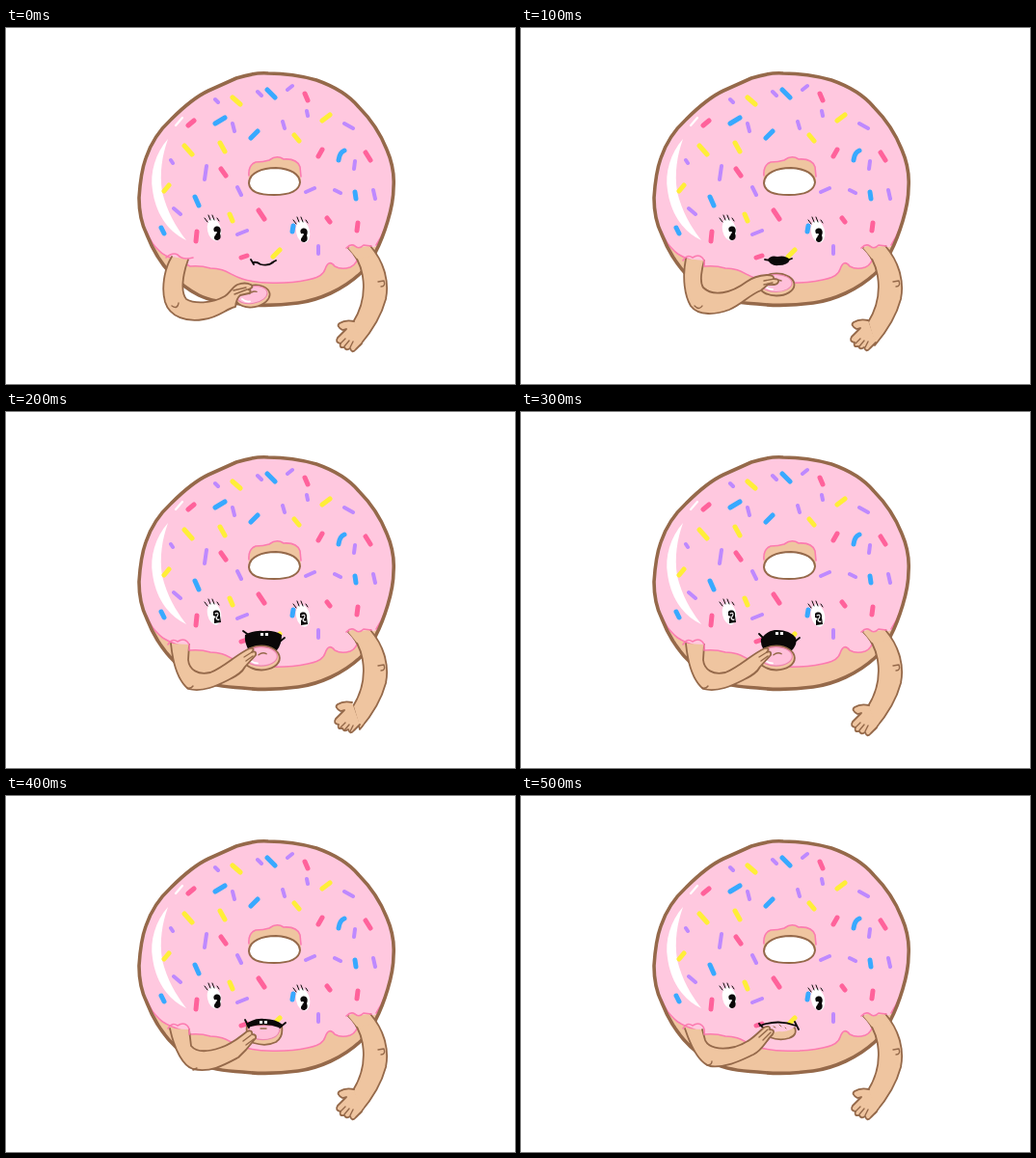
An HTML page that plays this animation: 528x369 px, repeating every 0.6 s.

```html
<!DOCTYPE html>
<html lang="en">
<head>
<meta charset="utf-8">
<title>Hungry donut</title>
<style>
  html, body { margin: 0; width: 100%; height: 100%; overflow: hidden; background: #fff; }
  svg { display: block; width: 100%; height: 100%; fill: none; stroke-linecap: round; stroke-linejoin: round; }
  .dough { fill: #efc5a0; }
  .skin { fill: #efc5a0; stroke: #95694a; stroke-width: 1.8; }
  .mark { stroke: #95694a; stroke-width: 1.4; }
  .crust { stroke: #95694a; stroke-width: 3.6; }
  .rim { stroke: #fc7bb0; stroke-width: 1.6; }
  .icing { fill: #ffc8df; }
  .glaze { fill: #ffc0da; stroke: #ee86b0; stroke-width: 1.1; }
  .white { fill: #fff; }
  .ink { fill: #0a0808; }
  .line { stroke: #0a0808; stroke-width: 1.8; }
  .lash { stroke: #0a0808; stroke-width: 1; }
  .sprinkles { stroke-width: 5; }
</style>
</head>
<body>
<svg viewBox="0 0 528 369">
  <defs>
    <path id="ring" d="M146 214C140 202 138 188 138 176C139 160 141 146 145 135C150 120 159 106 171 95C182 84 195 72 210 65L239 52C252 48 262 46 272 47C290 47 308 50 322 54C342 61 356 70 366 82C380 96 389 111 395 126C401 140 403 152 402 165C402 178 399 190 396 200C390 220 382 240 368 254C350 271 325 282 303 285C280 288 262 288 245 286C225 285 210 282 200 277C175 264 157 242 146 214Z"/>
    <clipPath id="inside"><use href="#ring"/></clipPath>
    <g id="eye">
      <ellipse class="white" rx="7" ry="11.7" transform="rotate(-12)"/>
      <path class="lash" d="M-10-12l3 4M-6-15l2 5M-2-15l2 5M3-12l2 3"/>
    </g>
    <g id="pupil">
      <path class="ink" d="M-1-5C4-7 6-2 4 2C6 7 3 9 1 9C-2 9-3 6-1 4C1 2-1 1-2 0C-3-2-3-4-1-5Z"/>
      <ellipse class="white" cx="-.5" cy="1" rx="1.5" ry="1.1"/>
    </g>
    <g id="smallPupil">
      <path class="ink" d="M-3-4C0-7 5-5 4 0L5 7L-2 8L-2 3L0 1L-3 0Z"/>
      <path d="M-1-2Q2-4 2-1L0 3Q2 5 3 4" stroke="#fff" stroke-width="1.1"/>
    </g>
    <g id="snack">
      <ellipse class="skin" rx="18.5" ry="11.5"/>
      <ellipse class="glaze" cx="-.5" cy="-1.5" rx="16.5" ry="9"/>
      <path d="M-12 1q3 4 8 4" stroke="#fff" stroke-width="1.8"/>
      <path class="mark" d="M-3-3q4-3 8-1"/>
    </g>
    <path id="cuff" class="rim" d="M168 241Q172 234 178 238Q184 234 188 238Q191 241 190 247"/>
  </defs>

  <use href="#ring" class="dough"/>
  <path class="icing" clip-path="url(#inside)" d="M120 30H420V190L385 226L366 232Q365 245 357 248Q348 251 341 247Q335 239 331 250Q329 258 313 261C290 266 261 265 245 260C232 256 228 249 212 249Q202 246 191 247C177 240 165 238 159 231Q150 223 146 211H120Z"/>
  <path class="rim" d="M146 211Q150 223 159 231C165 238 177 240 191 247Q202 246 212 249C228 249 232 256 245 260C261 265 290 266 313 261Q329 258 331 250Q335 239 341 247Q348 251 357 248Q365 245 366 232M400 186Q395 208 384 225"/>
  <use href="#ring" class="crust"/>

  <path class="dough" d="M252 160Q250 142 259 139Q267 139 273 137Q281 131 288 136Q302 135 305 144L306 160Z"/>
  <path class="rim" d="M252 153Q251 142 259 139Q267 139 273 137Q281 131 288 136Q302 135 305 144L306 154"/>
  <path class="white mark" style="stroke-width:2" d="M252 161C252 150 266 145 280 145C295 146 304 151 305 160C304 169 293 173 278 173C262 173 253 170 252 161Z"/>

  <path class="white" d="M168 115C155 130 149 150 152 168C155 190 166 210 187 220C176 206 167 190 162 170C159 150 162 132 168 115Z"/>
  <path stroke="#fff" stroke-width="2.2" d="M176 101l7-8"/>

  <g class="sprinkles">
    <path stroke="#38a9ff" d="M271 64l8 8M217 99l10-6M254 114l7-7M345 137q1-8 6-10M196 175l4 9M362 170l1 7M161 207l3 6M298 205l-1 6"/>
    <path stroke="#ffee38" d="M235 72l8 7M328 96l8-6M299 111l5 6M185 122l8 9M222 119l5 9M164 169l5-6M232 193l3 7M277 237l7-7"/>
    <path stroke="#ff629b" d="M310 68l3 7M189 101l6-5M223 146l5 7M324 133l4-7M373 129l5 8M333 197l3 4M262 189l6 9M198 211l-1 10M364 210l1-8M244 238l6-2"/>
    <path stroke="#be89ff" stroke-width="4" d="M217 74l3 3M292 64l5-4M261 66l4 4M312 86l1 5M235 99l2 8M287 97l2 7M351 99l9 5M171 137l2 3M208 143l-2 14M240 165l4 8M362 138l-1 8M381 168l2 9M311 170l9-4M341 168l6 3M240 214l10-4M324 226v8M174 187l7 6"/>
  </g>

  <use href="#eye" x="216" y="209"/>
  <use href="#eye" x="308" y="211"/>
  <g id="pupils">
    <use x="218" y="211"/>
    <use x="308" y="213"/>
  </g>

  <path class="skin" d="M355 228C373 245 377 278 360 305L367 329C379 315 389 300 394 281C398 261 391 241 378 226"/>
  <path class="dough" d="M355 228L361 225L366 228L377 226L382 236L364 239Z"/>
  <path class="rim" d="M353 228Q358 223 362 226Q366 230 371 225L379 226"/>
  <path class="mark" d="M386 263l6-1q2 6-3 6"/>
  <path id="hand" class="skin" d="M361 304Q352 302 346 306Q342 309 349 313L353 312L344 321Q341 326 347 327Q345 332 351 331Q353 335 357 332Q359 338 363 333L369 327"/>
  <path class="mark" d="M347 327l5-5M351 330l5-6M357 331l3-6"/>

  <g class="pose">
    <path class="line" d="M254 240l3 5M256 243Q260 242 264 245Q272 247 277 243M276 243l4-2"/>
    <use href="#snack" transform="translate(256 278) rotate(-10) scale(.96 .98)"/>
    <path class="skin" d="M172 237C164 250 161 270 165 284C170 300 188 305 205 302C221 300 228 291 238 289Q239 280 243 277L252 275Q256 272 251 271Q258 269 254 266Q248 263 240 266C234 269 232 275 227 278C213 286 195 286 187 281C181 274 183 256 189 240"/>
    <path class="mark" d="M172 288q6 4 7-3M237 276l13-5M236 272l13-3"/>
    <path class="rim" d="M166 238Q173 232 178 235Q183 241 194 238"/>
  </g>
  <g class="pose">
    <path class="line" d="M253 240l5 1M275 241l6-2"/>
    <path class="ink" d="M256 240Q259 235 266 237Q274 235 279 240Q277 246 267 246Q259 247 256 240Z"/>
    <use href="#snack" transform="translate(265 266)"/>
    <path class="skin" d="M171 239C167 260 170 278 176 288C184 299 203 297 216 292C230 286 236 277 249 272L256 266Q266 267 267 263Q268 260 262 260Q263 256 255 256Q242 257 234 263C218 275 199 279 189 269C185 263 187 252 190 241"/>
    <path class="mark" d="M180 288q5 5 8 0M252 262l11-2M252 266l9-2"/>
    <use href="#cuff"/>
  </g>
  <g class="pose">
    <path class="ink" d="M248 231Q257 226 267 227Q278 226 286 231Q286 241 281 247L252 247Q247 239 248 231Z"/>
    <path class="line" d="M246 227l7 5M289 234l-5 4"/>
    <path class="white" d="M264 229h3v3h-3zM269 229h3v3h-3z"/>
    <use href="#snack" transform="translate(265 255) scale(1.02 1.08)"/>
    <use id="reach" href="#reachArm"/>
  </g>
  <g class="pose">
    <path class="ink" d="M249 235Q255 227 263 226Q278 225 285 234Q287 241 281 247L252 247Q248 241 249 235Z"/>
    <path class="line" d="M247 230l5 5M289 234l-5 4"/>
    <path class="white" d="M264 228h3v3h-3zM269 228h3v3h-3z"/>
    <use href="#snack" transform="translate(265 255) scale(1.02 1.08)"/>
    <use href="#reachArm"/>
  </g>
  <g class="pose">
    <path class="skin" d="M250 238H286Q288 250 280 255Q270 260 257 256Q248 250 250 238Z"/>
    <path class="glaze" d="M251 238H284Q285 248 276 251Q264 255 254 249Z"/>
    <path class="ink" d="M249 236Q258 230 268 231Q280 231 287 237L283 240Q268 234 251 240Z"/>
    <path class="line" d="M248 232l4 8M290 235l-6 5"/>
    <path class="white" d="M263 233h3v3h-3zM268 233h3v3h-3z"/>
    <path class="mark" d="M264 241h6"/>
    <path class="skin" d="M170 241C175 264 184 280 194 283C212 287 226 279 241 271L249 263L259 251Q260 247 255 247Q256 242 250 244C242 250 235 257 222 261C207 266 197 265 192 259L190 242"/>
    <path class="mark" d="M194 284l4-2M246 254l8-6M249 258l8-6"/>
    <use href="#cuff"/>
  </g>
  <g class="pose">
    <path class="skin" d="M252 240Q268 234 284 240Q287 248 278 251Q268 254 258 250Z"/>
    <path class="icing" d="M252 238Q268 232 284 239Q278 245 268 244L254 246Z"/>
    <path class="line" d="M248 238Q267 231 285 238M247 236l5 5M284 234l4 8"/>
    <path class="mark" style="stroke-width:1" d="M262 239l2 1M268 237l2 2M274 240l1 1"/>
    <path class="skin" d="M170 241C177 262 186 277 196 280C214 282 230 273 241 268C251 263 253 255 261 247Q264 242 258 242Q259 237 252 240C245 246 238 255 222 260C205 264 194 260 191 253L188 242"/>
    <path class="mark" d="M193 279q5 0 5-4M247 250l9-8M251 253l8-8"/>
    <use href="#cuff"/>
  </g>

  <defs>
    <g id="reachArm">
      <path class="skin" d="M171 240C173 260 178 278 189 287C205 291 220 283 232 277C240 273 245 270 248 264L259 252Q260 247 255 249Q259 244 253 245C239 251 227 264 212 270C199 273 190 267 189 257L190 241"/>
      <path class="mark" d="M188 286q4 1 6-2M247 254l8-5M249 258l7-5"/>
      <use href="#cuff"/>
    </g>
  </defs>
</svg>
<script>
  const STEP = 100;
  const poses = [...document.querySelectorAll('.pose')];
  const pupils = document.querySelectorAll('#pupils use');
  const hand = document.getElementById('hand');
  const handShift = [[0, 0], [-1, -1], [-2, -3], [0, 0], [0, 0], [0, 0]];

  function draw(now) {
    const n = Math.floor(now / STEP) % poses.length;
    poses.forEach((pose, i) => pose.style.display = i === n ? '' : 'none');
    const kind = n === 2 || n === 3 ? '#smallPupil' : '#pupil';
    pupils.forEach(p => p.setAttribute('href', kind));
    hand.setAttribute('transform', `translate(${handShift[n]})`);
  }

  const start = performance.now();
  function tick() {
    draw(performance.now() - start);
    requestAnimationFrame(tick);
  }
  tick();
</script>
</body>
</html>
```
